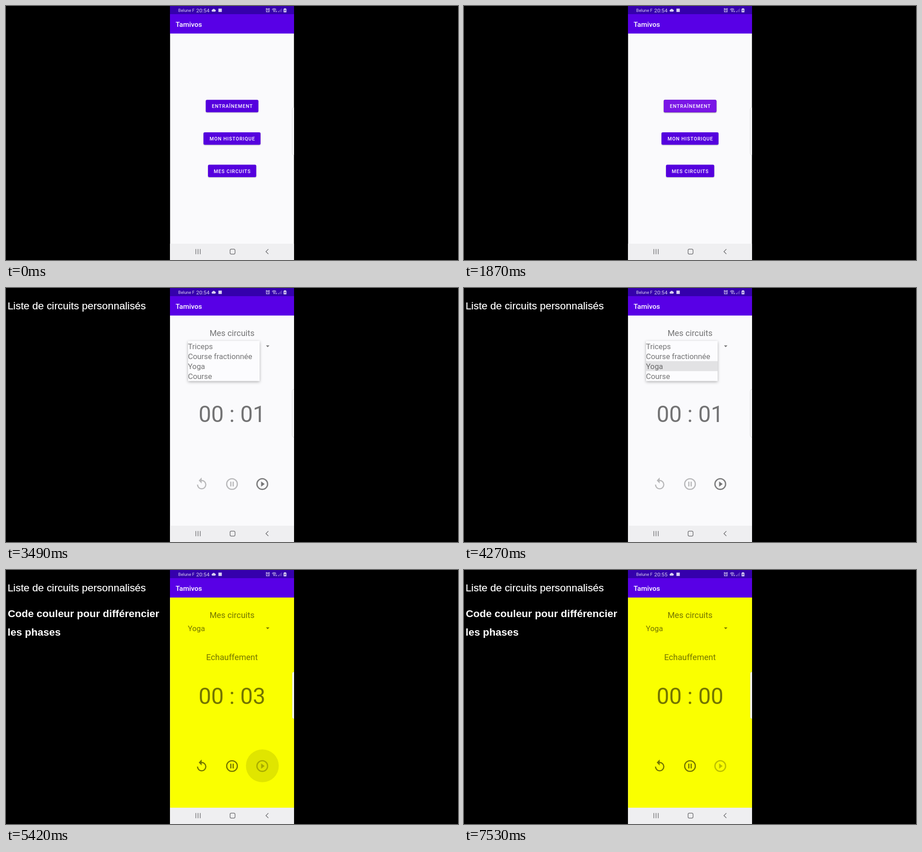
Recreate the animation shown at these times as an HTML page. Size 998x561 px, loop 8 s.

```html
<!DOCTYPE html>
<html lang="fr">
<head>
<meta charset="utf-8">
<title>Circuits</title>
<style>
  html, body { margin: 0; width: 100%; height: 100%; overflow: hidden; background: #000; }
  svg { display: block; width: 100vw; height: 100vh; }
  text { font-family: Roboto, sans-serif; }
  .mid { text-anchor: middle; }
  .app { fill: rgba(0, 0, 0, .54); }
  .head { font-size: 18.3px; }
  .item { font-size: 16.8px; }
  .timer { font-size: 49.4px; }
  .label { font-size: 10.64px; font-weight: 500; letter-spacing: .95px; fill: #fff; }
  .note { font: 22.9px "Liberation Sans", Arial, sans-serif; fill: #fff; stroke: #fff; stroke-width: .25px; }
  .bold { font-weight: 700; stroke: none; }
  .btn { fill: #5500de; filter: drop-shadow(0 1px 1px rgba(0, 0, 0, .25)); }
  .popup { filter: drop-shadow(0 2px 3px rgba(0, 0, 0, .3)); }

  .anim { animation: 8s linear infinite; }
  .cut { animation: 8s step-end infinite; }

  /* 1% of the loop is 80 ms */
  .press    { animation-name: press; }
  .training { animation-name: training; }
  .note1    { animation-name: note1; }
  .note2    { animation-name: note2; }
  .open     { animation-name: open; }
  .row      { animation-name: row; }
  .ripple   { animation-name: ripple; transform-origin: 566px 432.5px; }
  .before-pick  { animation-name: beforePick; }
  .after-pick   { animation-name: afterPick; }
  .before-start { animation-name: beforeStart; }
  .after-start  { animation-name: afterStart; }
  .enable   { animation-name: enable; }
  .disable  { animation-name: disable; }
  .three { animation-name: three; }
  .two   { animation-name: two; }
  .one   { animation-name: one; }
  .zero  { animation-name: zero; }
  .min54 { animation-name: min54; }
  .min55 { animation-name: min55; }

  @keyframes press { 0%, 19.5% { opacity: 0 } 22.2%, 100% { opacity: 1 } }
  @keyframes training { 0%, 23.6% { opacity: 0 } 25%, 100% { opacity: 1 } }
  @keyframes note1 { 0%, 35.6% { opacity: 0 } 37.2%, 100% { opacity: 1 } }
  @keyframes note2 { 0%, 66.1% { opacity: 0 } 67.5%, 100% { opacity: 1 } }
  @keyframes open { 0%, 41.6% { opacity: 0 } 43.5%, 54.4% { opacity: 1 } 57%, 100% { opacity: 0 } }
  @keyframes row { 0%, 51.4% { opacity: 0 } 53%, 100% { opacity: 1 } }
  @keyframes ripple {
    0%, 66.1% { opacity: 0; transform: scale(.3) }
    67.4%, 68% { opacity: 1; transform: scale(1) }
    73.5%, 100% { opacity: 0; transform: scale(1) }
  }
  @keyframes beforePick { 0% { opacity: 1 } 55%, 100% { opacity: 0 } }
  @keyframes afterPick { 0% { opacity: 0 } 55%, 100% { opacity: 1 } }
  @keyframes beforeStart { 0% { opacity: 1 } 67.5%, 100% { opacity: 0 } }
  @keyframes afterStart { 0% { opacity: 0 } 67.5%, 100% { opacity: 1 } }
  @keyframes enable { 0% { opacity: .26 } 67.5%, 100% { opacity: .54 } }
  @keyframes disable { 0% { opacity: .54 } 67.5%, 100% { opacity: .26 } }
  @keyframes three { 0% { opacity: 0 } 55% { opacity: 1 } 68%, 100% { opacity: 0 } }
  @keyframes two { 0% { opacity: 0 } 68% { opacity: 1 } 80.5%, 100% { opacity: 0 } }
  @keyframes one { 0% { opacity: 1 } 55% { opacity: 0 } 80.5% { opacity: 1 } 93%, 100% { opacity: 0 } }
  @keyframes zero { 0% { opacity: 0 } 93%, 100% { opacity: 1 } }
  @keyframes min54 { 0% { opacity: 1 } 70%, 100% { opacity: 0 } }
  @keyframes min55 { 0% { opacity: 0 } 70%, 100% { opacity: 1 } }
</style>
</head>
<body>
<svg viewBox="0 0 998 561">
  <defs><clipPath id="screen"><rect x="362.3" width="273.5" height="561"/></clipPath></defs>
  <rect width="998" height="561"/>

  <g clip-path="url(#screen)">
    <rect x="362" width="274" height="561" fill="#fafafc"/>

    <!-- Home -->
    <rect class="btn" x="441" y="207.3" width="116.3" height="27.4" rx="3"/>
    <rect class="btn anim press" x="441" y="207.3" width="116.3" height="27.4" rx="3" style="fill:#7a16e6"/>
    <rect class="btn" x="436" y="279" width="126" height="27.4" rx="3"/>
    <rect class="btn" x="446" y="350.6" width="106.5" height="27.4" rx="3"/>
    <g class="label mid">
      <text x="499.8" y="225">ENTRAÎNEMENT</text>
      <text x="499.8" y="296.8">MON HISTORIQUE</text>
      <text x="499.8" y="368.5">MES CIRCUITS</text>
    </g>

    <!-- Training -->
    <g class="anim training">
      <rect x="362" y="60" width="274" height="466" fill="#fafafc"/>
      <rect class="cut after-start" x="362" y="60" width="274" height="466" fill="#faff00"/>
      <g class="app">
        <text class="head mid" x="499" y="106">Mes circuits</text>
        <text class="item cut before-pick" x="401.6" y="135">Triceps</text>
        <text class="item cut after-pick" x="401.6" y="135">Yoga</text>
        <path d="M574 126.8h7.6l-3.8 3.9z"/>
        <text class="head mid" x="499" y="199">Echauffement</text>
        <g class="timer mid">
          <text class="cut three" x="499" y="296">00 : 03</text>
          <text class="cut two" x="499" y="296">00 : 02</text>
          <text class="cut one" x="499" y="296">00 : 01</text>
          <text class="cut zero" x="499" y="296">00 : 00</text>
        </g>
      </g>

      <circle class="anim ripple" cx="566" cy="432.5" r="36.3" fill="rgba(0,0,0,.1)"/>
      <g class="cut enable">
        <path transform="translate(416.3 417.3) scale(1.31)" d="M12 5V1L7 6l5 5V7a6 6 0 1 1-6 6H4a8 8 0 1 0 8-8z"/>
        <g transform="translate(499 433) scale(1.31)">
          <circle r="9" fill="none" stroke="#000" stroke-width="2"/>
          <path d="M-3-4h2v8h-2zM1-4h2v8H1z"/>
        </g>
      </g>
      <g class="cut disable" transform="translate(565.8 433) scale(1.31)">
        <circle r="9" fill="none" stroke="#000" stroke-width="2"/>
        <path d="M-2-4.5v9L4 0z"/>
      </g>

      <g class="anim open">
        <rect class="popup" x="402" y="117" width="158" height="88.5" fill="#fcfcfe"/>
        <rect class="anim row" x="402" y="161.5" width="158" height="22" fill="rgba(0,0,0,.1)"/>
        <g class="app item">
          <text x="401.8" y="134.5">Triceps</text>
          <text x="401.8" y="156.8">Course fractionnée</text>
          <text x="401.8" y="179">Yoga</text>
          <text x="401.8" y="201.3">Course</text>
        </g>
      </g>
    </g>

    <!-- Edge handle -->
    <rect class="cut before-start" x="632" y="223.5" width="12" height="106.5" rx="5" fill="#fcfcfd" stroke="#d2d2d2" stroke-width=".9"/>
    <rect class="cut after-start" x="632" y="225" width="12" height="103.5" rx="4" fill="#fafaf4" stroke="#d5d88a" stroke-width=".6"/>

    <!-- Bars -->
    <rect x="362" y="18" width="274" height="42.8" fill="#5800e6"/>
    <rect x="362" width="274" height="18" fill="#3500ac"/>
    <text x="374.4" y="45.5" font-size="15.5" font-weight="500" fill="#fff">Tamivos</text>
    <g fill="#d9d0f2">
      <text x="380.3" y="13.2" font-size="9.4">Belune F</text>
      <g font-size="11.8">
        <text class="cut min54" x="420" y="13.8">20:54</text>
        <text class="cut min55" x="420" y="13.8">20:55</text>
      </g>
      <path d="M455.5 12.5a2.2 2.2 0 0 1 0-4.2a3.2 3.2 0 0 1 5.6-.5a2.4 2.4 0 0 1 .4 4.7z"/>
      <rect x="469" y="5.7" width="7.5" height="7.5"/>
      <g fill="none" stroke="#d9d0f2" stroke-width="1.2">
        <circle cx="578" cy="9.7" r="3.3"/>
        <path d="M578 7.8v2.2h1.5M573.8 6.8l2-1.9M582.2 6.8l-2-1.9M575.5 12.4l-1 1.2M580.5 12.4l1 1.2"/>
        <path d="M587.6 7.8q4.4-3.8 8.8 0M589.2 9.8q2.8-2.4 5.6 0"/>
      </g>
      <circle cx="592" cy="12" r="1.3"/>
      <path d="M595 10.5h1v3h-1zM597 10.5h1v3h-1zM601 11.5h1.2v2H601z"/>
      <path opacity=".4" d="M603.2 9.5h1.2v4h-1.2zM605.4 7.5h1.2v6h-1.2zM607.6 5.5h1.2v8h-1.2z"/>
      <path d="M614.5 5h3v1h1.6v8h-6.2V6h1.6z"/>
      <path fill="#3500ac" d="M616.6 7l-2.2 3.4h1.3l-.4 2.5 2.4-3.5h-1.4z"/>
    </g>
    <rect x="362" y="525" width="274" height="36" fill="#efeff1"/>
    <g fill="none" stroke="#77777a" stroke-width="1.5">
      <path d="M419.2 536.8v11.4M424 536.8v11.4M428.8 536.8v11.4"/>
      <rect x="494.7" y="537" width="11" height="11" rx="3"/>
      <path d="M579.3 537l-5.4 5.4 5.4 5.4"/>
    </g>
  </g>

  <!-- Captions -->
  <text class="note anim note1" x="3.4" y="47">Liste de circuits personnalisés</text>
  <g class="anim note2">
    <text class="note bold" x="4" y="103.7">Code couleur pour différencier</text>
    <text class="note bold" x="3.6" y="144.5">les phases</text>
  </g>
</svg>
</body>
</html>
```
